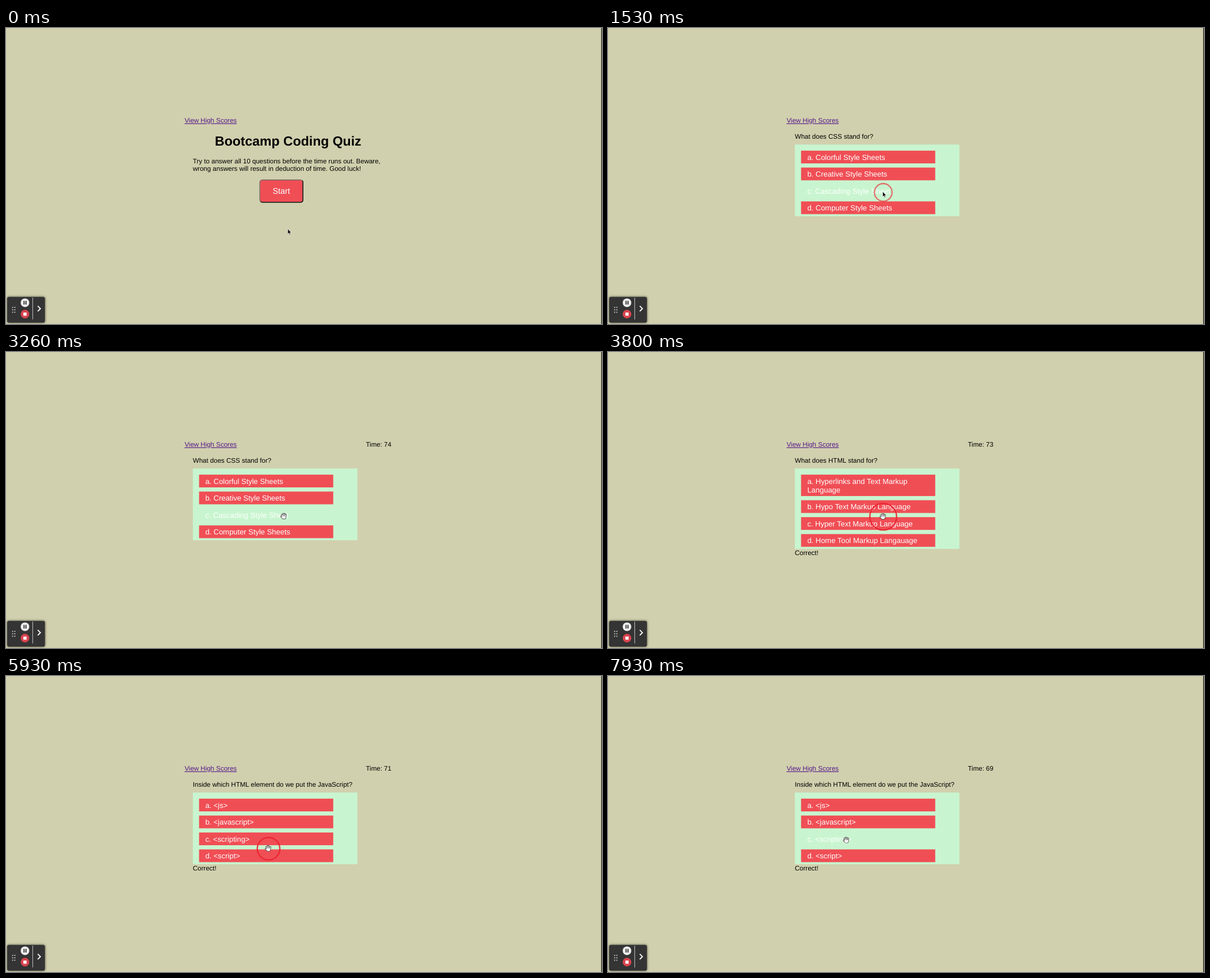
These frames come from a looping animation (1036 px wide and 516 px high, 8 s). An HTML page:

```html
<!DOCTYPE html>
<html lang="en">
<head>
<meta charset="utf-8">
<title>Coding quiz</title>
<style>
  html, body { margin: 0; width: 100%; height: 100%; overflow: hidden; background: #d1d0ae; }
  svg { display: block; width: 1036px; height: 516px; }
  text { font: 11.52px "Liberation Sans", Arial, sans-serif; text-rendering: geometricPrecision; white-space: pre; }
  .link { fill: #551a8b; text-decoration: underline; }
  .title { font-size: 23.04px; font-weight: bold; }
  .start { font-size: 14.4px; fill: #fff; }
  .option { font-size: 12.96px; fill: #fff; }
  .panel { filter: drop-shadow(0 0 2px #0009); }
</style>
</head>
<body>
<svg viewBox="0 0 1036 516">
  <rect width="1036" height="516" fill="#d1d0ae"/>
  <rect x="1034.7" width="1.3" height="516" fill="#25251f"/>
  <text class="link" x="310.4" y="165.2">View High Scores</text>
  <text id="time" x="625.5" y="165.2"></text>

  <g id="intro">
    <text class="title" x="363" y="204.9">Bootcamp Coding Quiz</text>
    <text x="324.8" y="236.2">Try to answer all 10 questions before the time runs out. Beware,</text>
    <text x="324.8" y="249.2">wrong answers will result in deduction of time. Good luck!</text>
    <rect x="441.2" y="264.7" width="75" height="39" rx="4.5" fill="#f04e55" stroke="#77726a" stroke-width="1.5"/>
    <path d="M515.1 266Q516.2 267 516.2 269.2V299.2Q516.2 303.7 511.7 303.7H445.7Q443.4 303.7 442.4 302.6" fill="none" stroke="#1d1c1c" stroke-width="1.5"/>
    <text class="start" x="463.4" y="289.1">Start</text>
  </g>
  <g id="quiz"></g>

  <g class="panel"><rect x="2" y="468.7" width="65.7" height="45" rx="3" fill="#343434"/></g>
  <path d="M11.6 487h.01M15.4 487h.01M11.6 491.2h.01M15.4 491.2h.01M11.6 495.4h.01M15.4 495.4h.01" stroke="#d8d8d8" stroke-width="2" stroke-linecap="round"/>
  <circle cx="33" cy="478.9" r="7.5" fill="#ececec"/>
  <path d="M31.4 475.8v6.2M34.7 475.8v6.2" stroke="#222" stroke-width="1.7"/>
  <circle cx="33" cy="498.8" r="7.5" fill="#d8434e"/>
  <rect x="30.2" y="496" width="5.6" height="5.6" rx=".6" fill="#fff"/>
  <path d="M46.4 470V508" stroke="#c4c4c4"/>
  <path d="M55.2 484.6L59.8 489.2L55.2 493.8" fill="none" stroke="#fff" stroke-width="1.8"/>

  <circle id="ring" fill="none" stroke="#ea2430" stroke-width="2.3"/>
  <path id="arrow" d="M0 0V9.4L2.1 7.5L3.5 10.8L5.1 10.1L3.7 6.9H6.5Z" fill="#111" stroke="#fff" stroke-width=".7"/>
  <g id="hand" stroke-linecap="round" stroke-linejoin="round"></g>
</svg>
<script>
const LOOP = 8000, FIRST_TICK = 2530, LEFT = 74;

const questions = [
  { from: 1530, ask: 'What does CSS stand for?', options: [
    ['a. Colorful Style Sheets'], ['b. Creative Style Sheets'],
    ['c. Cascading Style Sheet'], ['d. Computer Style Sheets']] },
  { from: 3800, ask: 'What does HTML stand for?', note: 'Correct!', options: [
    ['a. Hyperlinks and Text Markup', 'Language'], ['b. Hypo Text Markup Language'],
    ['c. Hyper Text Markup Language'], ['d. Home Tool Markup Langauage']] },
  { from: 5800, ask: 'Inside which HTML element do we put the JavaScript?', note: 'Correct!', options: [
    ['a. <js>'], ['b. <javascript>'], ['c. <scripting>'], ['d. <script>']] }
];

// start, end, x and y reached at the end
const moves = [
  [60, 860, 478.5, 288], [930, 1060, 478, 286],
  [2460, 2930, 484, 286], [3130, 3600, 478, 286.6],
  [3870, 4530, 472, 288.2], [5130, 5660, 456, 300.5],
  [7400, 7900, 414.3, 286]
];
const origin = [490.3, 351];

// shown from, growth begins
const clicks = [[1530, 1530], [3800, 3560], [5800, 5800]];

const $ = id => document.getElementById(id);
const [timeEl, intro, quiz, ring, arrow, hand] =
  ['time', 'intro', 'quiz', 'ring', 'arrow', 'hand'].map($);

function add(parent, tag, attrs, text) {
  const el = document.createElementNS('http://www.w3.org/2000/svg', tag);
  for (const k in attrs) el.setAttribute(k, attrs[k]);
  if (text) el.textContent = text;
  return parent.appendChild(el);
}
const show = (el, on) => el.setAttribute('visibility', on ? 'visible' : 'hidden');

function buildQuestion(q) {
  q.group = add(quiz, 'g', { display: 'none' });
  add(q.group, 'text', { x: 324.8, y: 193 }, q.ask);
  const box = add(q.group, 'rect', { x: 324.8, y: 203.1, width: 286, fill: '#c8f5cf' });
  let y = 213.8;
  q.rows = q.options.map(lines => {
    const h = 7.1 + 15.1 * lines.length;
    const rect = add(q.group, 'rect', { x: 335.6, y, width: 233.2, height: h, fill: '#f04e55' });
    lines.forEach((line, i) =>
      add(q.group, 'text', { class: 'option', x: 346.4, y: y + 15.7 + 15.1 * i }, line));
    const row = { rect, top: y, bottom: y + h };
    y += h + 7.3;
    return row;
  });
  const end = y - 3.7;
  box.setAttribute('height', end - 203.1);
  if (q.note) add(q.group, 'text', { x: 324.8, y: end + 10.8 }, q.note);
}

function buildHand() {
  const d = 'M-3.3-2.4L-2 1.4M-1.2-4.1L-.7 1M1.2-4L1 1M3.5-2.5L2.8 1.8M-4.6 .8L-1.8 3.6M-2 1H2.8L2 4H-1.4Z';
  add(hand, 'path', { d, fill: '#222', stroke: '#222', 'stroke-width': 2.7 });
  add(hand, 'path', { d, fill: '#fff', stroke: '#fff', 'stroke-width': 1.3 });
}

function cursorAt(t) {
  let [x, y] = origin;
  for (const [a, b, nx, ny] of moves) {
    if (t < a) break;
    const p = Math.min(1, (t - a) / (b - a)), e = p * p * (3 - 2 * p);
    x += (nx - x) * e;
    y += (ny - y) * e;
  }
  return [x, y];
}

function draw(t) {
  const [x, y] = cursorAt(t);
  const current = questions.filter(q => t >= q.from).pop();
  show(intro, !current);
  for (const q of questions) {
    q.group.setAttribute('display', q === current ? 'inline' : 'none');
    for (const r of q.rows) r.rect.setAttribute('opacity', y >= r.top && y <= r.bottom ? 0 : 1);
  }
  timeEl.textContent = t < FIRST_TICK ? '' : 'Time: ' + (LEFT - Math.floor((t - FIRST_TICK) / 1000));

  const isHand = t >= 1600;
  show(arrow, !isHand);
  show(hand, isHand);
  arrow.setAttribute('transform', `translate(${x - .6} ${y - 1})`);
  hand.setAttribute('transform', `translate(${x} ${y})`);

  const click = clicks.filter(c => t >= c[0]).pop();
  const age = click ? t - click[1] : Infinity;
  show(ring, age < 330);
  if (age < 330) {
    ring.setAttribute('cx', x + .4);
    ring.setAttribute('cy', y + .6);
    ring.setAttribute('r', 15.3 + age * .033);
    ring.setAttribute('opacity', Math.min(.92, .62 + age * .0025));
  }
}

questions.forEach(buildQuestion);
buildHand();
const t0 = performance.now();
function tick() {
  draw((performance.now() - t0) % LOOP);
  requestAnimationFrame(tick);
}
tick();
</script>
</body>
</html>
```
